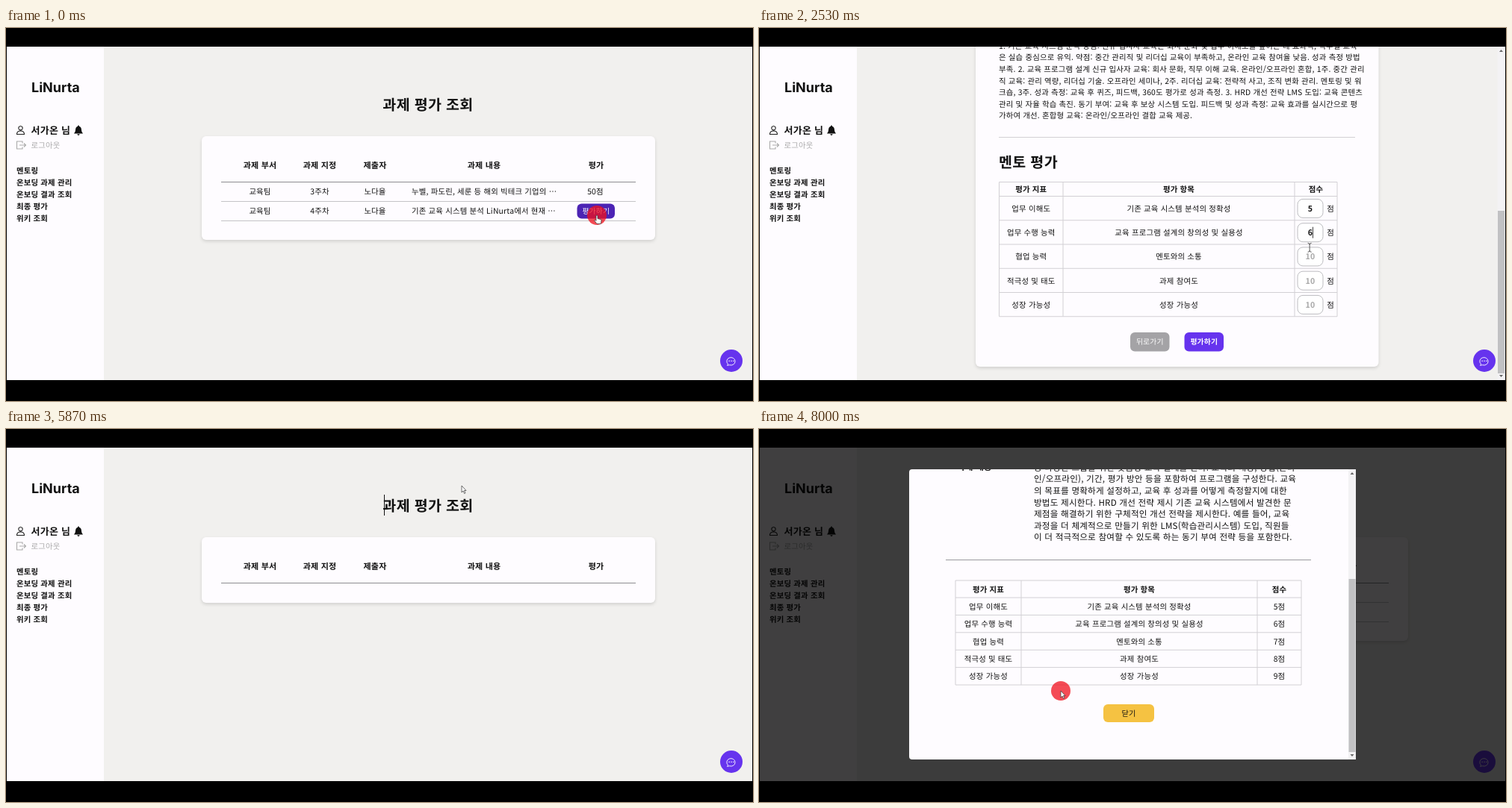
Animation of 1000x500 px, one loop 8070 ms. Source, as an HTML page:

```html
<!DOCTYPE html>
<html lang="ko">
<head>
<meta charset="utf-8">
<style>
html, body { margin: 0; width: 100%; height: 100%; overflow: hidden; background: #000; }
svg { display: block; width: 100%; height: 100%; }
text { font-family: "Noto Sans CJK KR", "Noto Sans KR", "Noto Sans CJK", sans-serif; fill: #111;
  letter-spacing: .0175em; text-rendering: geometricPrecision; white-space: pre; }
.b { font-weight: 700; }
.m { text-anchor: middle; }
.g { fill: #a9a9a9; }
.w { fill: #fff; }
.logo { font-family: Inter, sans-serif; letter-spacing: 0; }
.card { fill: #fefcff; filter: drop-shadow(0 2px 2px #0002); }
.line { fill: none; stroke: #d2d0d4; }
.icon { fill: none; stroke: #222; stroke-width: 1.1; }
</style>
</head>
<body>
<svg id="stage" viewBox="0 0 1000 500"></svg>
<script>
const LOOP = 8070, FPS = 15;
const PURPLE = '#6633ee';
const COMPANY = 'LiNurta', MENTOR = '서가온', STUDENT = '노다율';

// "|" marks line ends on the page, "^" those in the dialog
const TASK = `기존 교육 시스템 분석 ${COMPANY}에서 현재 제공하는 교육 프로그램을 분^석하고, 어떤 부분이 잘 작동하고, 어떤 부|분에서 개선이 필요한지 평가^한다. 직원들의 피드백을 바탕으로 프로그램의 강점과 약점을 도출한다.^ 프로그램|의 목표 달성도, 참여도, 효과성 등을 분석한다. 교육 프로그램^ 설계 조직의 목표와 직원들의 역량 개발 요구를 반|영하여, 개선된 교육^ 프로그램을 설계한다. 교육 대상: 신규 입사자, 중간 관리직, 리더십 교육^ 등 다양한 그룹을| 위한 맞춤형 교육 설계를 한다. 교육의 내용, 방법(온라^인/오프라인), 기간, 평가 방안 등을 포함하여 프로그램을| 구성한다. 교육^의 목표를 명확하게 설정하고, 교육 후 성과를 어떻게 측정할지에 대한^ 방법도 제시한다. HRD 개|선 전략 제시 기존 교육 시스템에서 발견한 문^제점을 해결하기 위한 구체적인 개선 전략을 제시한다. 예를 들어,| 교육^과정을 더 체계적으로 만들기 위한 LMS(학습관리시스템) 도입, 직원들^이 더 적극적으로 참여할 수 있도록| 하는 동기 부여 전략 등을 포함한다.`;
const ANSWER = `1. 기존 교육 시스템 분석 강점: 신규 입사자 교육은 회사 문화 및 업무 이해도를 높이는 데 효과적, 직무별 교육|은 실습 중심으로 유익. 약점: 중간 관리직 및 리더십 교육이 부족하고, 온라인 교육 참여율 낮음. 성과 측정 방법|부족. 2. 교육 프로그램 설계 신규 입사자 교육: 회사 문화, 직무 이해 교육. 온라인/오프라인 혼합, 1주. 중간 관리|직 교육: 관리 역량, 리더십 기술. 오프라인 세미나, 2주. 리더십 교육: 전략적 사고, 조직 변화 관리. 멘토링 및 워|크숍, 3주. 성과 측정: 교육 후 퀴즈, 피드백, 360도 평가로 성과 측정. 3. HRD 개선 전략 LMS 도입: 교육 콘텐츠|관리 및 자율 학습 촉진. 동기 부여: 교육 후 보상 시스템 도입. 피드백 및 성과 측정: 교육 효과를 실시간으로 평|가하여 개선. 혼합형 교육: 온라인/오프라인 결합 교육 제공.`;
const CRITERIA = [
  ['업무 이해도', '기존 교육 시스템 분석의 정확성'],
  ['업무 수행 능력', '교육 프로그램 설계의 창의성 및 실용성'],
  ['협업 능력', '멘토와의 소통'],
  ['적극성 및 태도', '과제 참여도'],
  ['성장 가능성', '성장 가능성'],
];

// y is the visual middle of the line
const text = (s, x, y, cls = '', size = 10.4) =>
  `<text x="${x}" y="${y + size * .37}" font-size="${size}" class="${cls}">${s}</text>`;
const rect = (x, y, w, h, fill, r = 0, more = '') =>
  `<rect x="${x}" y="${y}" width="${w}" height="${h}" rx="${r}" fill="${fill}" ${more}/>`;
const path = (d, more = 'class="line"') => `<path d="${d}" ${more}/>`;
const group = (id, body, more = '') => `<g id="${id}" ${more}>${body}</g>`;
const shift = (y, body) => `<g transform="translate(0 ${y})">${body}</g>`;
const lines = (s, x, y, size) =>
  s.split('|').map((l, i) => text(l.trim(), x, y + i * 15.58, '', size)).join('');
const button = (s, x, y, w, h, fill, cls, size = 9.8) =>
  rect(x, y, w, h, fill, 6) + text(s, x + w / 2, y + h / 2, 'm ' + cls, size);

function scoreTable(xs, top, head, row, lastCell) {
  const mid = i => (xs[i] + xs[i + 1]) / 2;
  const bottom = top + head + row * 5;
  let out = path(xs.map(x => `M${x} ${top}V${bottom}`).join('') + `M${xs[0]} ${top}H${xs[3]}`);
  ['평가 지표', '평가 항목', '점수'].forEach((s, i) => out += text(s, mid(i), top + head / 2 + .3, 'm b'));
  CRITERIA.forEach((c, k) => {
    const y = top + head + row * k, cy = y + row / 2 + .3;
    out += path(`M${xs[0]} ${y}H${xs[3]}`) + text(c[0], mid(0), cy, 'm') + text(c[1], mid(1), cy, 'm') + lastCell(k, cy, mid(2));
  });
  return out + path(`M${xs[0]} ${bottom}H${xs[3]}`);
}

function scrollbar(id, x, top, bottom, size) {
  const c = x + 5;
  return rect(x, top, 10, bottom - top, '#f3f2f4') +
    path(`M${c - 2.5} ${top + 7}l2.5 -3 2.5 3zM${c - 2.5} ${bottom - 7}l2.5 3 2.5 -3z`, 'fill="#666"') +
    rect(x + .5, 0, 9, size, '#c1c1c3', 0, `id="${id}"`);
}

const sidebar = rect(1, 25, 130, 447, '#fefcff') +
  text(COMPANY, 34, 79, 'b logo', 18) +
  path('M19.500 131.500a2.700 2.700 0 1 0 .01 0zM14.500 142.500q0 -4.500 5 -4.500t5 4.500z', 'class="icon"') +
  text(MENTOR + ' 님', 33.5, 137, 'b', 13) +
  path('M97 130.500q1 0 1 1.200q3 1 3 5q0 3 2 4.800h-12q2 -1.800 2 -4.800q0 -4 3 -5q0 -1.200 1 -1.200zM95.300 142.200h3.400q-.5 1.700 -1.700 1.700t-1.700 -1.700z', 'fill="#111"') +
  path('M22 154.500v-2.500h-7.500v10H22v-2.500M18 157h8.500m-2.500 -2.500 2.500 2.500 -2.500 2.500', 'class="icon" style="stroke:#aaa"') +
  text('로그아웃', 33.5, 157, 'g') +
  ['멘토링', '온보딩 과제 관리', '온보딩 결과 조회', '최종 평가', '위키 조회']
    .map((s, i) => text(s, 14, 191 + i * 16.1, 'b')).join('');

const columns = [340, 420, 494, 640, 790];
const listRow = (y, week, s) => text('교육팀', 340, y, 'm') + text(week, 420, y, 'm') +
  text(STUDENT, 494, y, 'm') + text(s, 543, y) + path(`M288 ${y + 13}H843`, 'class="line" style="stroke:#c4c4c6"');
const list = text('과제 평가 조회', 565, 103, 'm b', 19.5) +
  rect(262, 145, 607, 139, '', 6, 'class="card" id="listCard"') +
  ['과제 부서', '과제 지정', '제출자', '과제 내용', '평가'].map((s, i) => text(s, columns[i], 184, 'm b', 11)).join('') +
  path('M288 206.500H843', 'stroke="#8c8c90"') +
  group('rows',
    listRow(219.5, '3주차', '누벨, 파도린, 세룬 등 해외 빅테크 기업의 ⋯') + text('50점', 789, 219.5, 'm') +
    listRow(245.5, '4주차', `기존 교육 시스템 분석 ${COMPANY}에서 현재 ⋯`) +
    group('todo', button('평가하기', 764.5, 235.5, 50.5, 20, '#4c24b4', 'w')) +
    group('graded', text('35점', 789, 245.5, 'm'))) +
  path('M506.500 88V116', 'id="titleCaret" stroke="#111"');

const inputCell = (k, y) =>
  rect(721, y - 12.5, 34, 25, '#fff', 7, 'stroke="#bdbdc0"') +
  `<text id="score${k}" class="m b" x="738" y="${y + 4}" font-size="10.6"></text>` + text('점', 765, y, 'm') +
  path(`M0 ${y - 7.500}v15`, `id="caret${k}" stroke="#111" stroke-width=".8"`);
const detail = rect(290, 43, 539.5, 749, '', 6, 'class="card"') +
  text('HRD 시스템 개선 및 직원 교육 프로그램 설계', 321, 87, 'b', 19.5) +
  text('과제 파일', 321, 118, 'b', 12.2) + rect(380, 107, 35.5, 21, '#d3d2d5', 6) +
  path('M391.500 114.500l2.500 -1.500 5.500 6 -3 2.500 -5 -5zM393 116l4 4', 'fill="#aaa" stroke="#888"') +
  lines(TASK.replaceAll('^', ''), 321, 146) + path('M321 299.500H798') +
  text('과제 제출', 321, 334, 'b', 19.5) + lines(ANSWER, 321, 362) +
  shift(338, path('M321 146.500H798') + text('멘토 평가', 321, 180, 'b', 19.5) +
    scoreTable([321.5, 407, 717, 774], 206.5, 19, 32.25, inputCell) +
    button('뒤로가기', 497, 408, 52.5, 25.5, '#a4a3a6', 'w') +
    button('평가하기', 569.5, 408, 52.5, 25.5, PURPLE, 'w b'));

const chat = `<circle cx="971" cy="446" r="15" fill="${PURPLE}"/>` +
  path('M966.500 450.500a5.600 5.200 0 1 1 2 1.200l-3 .6z', 'fill="none" stroke="#fff" stroke-width=".9"') +
  path('M967.500 446.300h1.300m1.600 0h1.300m1.600 0h1.300', 'stroke="#fff" stroke-width="1.300"');

const alertBox = rect(354, 25, 291, 79, '#fff', 5, 'style="filter:drop-shadow(0 1px 3px #0005)"') +
  text('localhost:3000 내용:', 369, 43, '', 9.8) + text('평가가 완료되었습니다.', 369, 62, '', 8.6) +
  button('확인', 592, 76, 38, 20, '#1a63d8', 'w', 8.5);

const field = (name, value, y) => text(name, 265, y, 'b', 11.6) + text(value, 368, y, '', 11.6);
const modal = rect(1, 25, 998, 447, '#000', 0, 'opacity=".75"') +
  rect(201, 54, 598, 389, '#fefcff', 4) +
  `<g clip-path="url(#modalClip)">` + group('modalBody',
    field('제출자', STUDENT, 134) + field('과제 부서', '교육팀', 152) + field('과제 지정', '4주차', 170) +
    field('과제 내용', '', 281) + lines(TASK.replaceAll('|', '').replaceAll('^', '|'), 368, 188, 11.6) +
    path('M250 405.500H739', 'stroke="#9a9a9e"') +
    shift(230, scoreTable([263, 351, 667, 726], 203, 23, 23.4, (k, y, x) => text(k + 5 + '점', x, y, 'm')) +
      button('닫기', 461, 369, 68, 24, '#f5c242', '', 10.2))) + '</g>' +
  scrollbar('modalThumb', 789, 54, 443, 232);

const pointer = group('cursor',
  path('M0 0v9l2 -2 1.600 3.500 1.400 -.7 -1.600 -3.300h2.600z', 'id="arrow" fill="#fff" stroke="#333" stroke-width=".7"') +
  path('M-1 .5q1 -1 2 0v4l4 1q1 .3 1 1.500l-.8 4.500h-5.200l-3.500 -4.500q.3 -1.200 1.500 -.6l1 1z', 'id="hand" fill="#fff" stroke="#333" stroke-width=".7"') +
  path('M-2.500 -6q2.500 0 2.500 2v8q0 2 -2.500 2M2.500 -6q-2.500 0 -2.500 2M0 4q0 2 2.500 2', 'id="beam" fill="none" stroke="#333" stroke-width=".8"'));

stage.innerHTML = `<defs><clipPath id="pageClip">${rect(1, 25, 998, 447)}</clipPath>
  <clipPath id="modalClip">${rect(201, 54, 588, 389)}</clipPath></defs>` +
  rect(0, 0, 1000, 500, '#000') +
  `<g clip-path="url(#pageClip)">` + rect(1, 25, 998, 447, '#f1f0ee') +
  group('list', list) + group('detail', group('detailBody', detail) + scrollbar('pageThumb', 988.5, 25, 472, 218)) +
  sidebar + chat + group('alertBox', alertBox) + group('modal', modal) +
  '<circle id="click" r="13" fill="#f0101c" opacity=".75"/>' + pointer + '</g>';

const moves = [
  [190, 791, 251], [530, 683, 238], [1050, 683, 238], [1460, 730, 242], [1800, 730, 242], [2060, 738, 275],
  [2330, 738, 275], [2590, 737, 297], [2870, 737, 297], [3190, 738, 338], [3450, 738, 338], [3530, 735, 369],
  [4200, 735, 369], [4660, 595, 421], [4930, 595, 421], [5330, 610, 76], [5930, 610, 76], [6330, 552, 245],
  [6660, 552, 245], [7330, 498, 270], [7400, 498, 270], [7920, 404, 351],
];
const clicks = [-10, 1460, 2060, 2590, 3190, 3920, 4725, 5390, 6330, 7920];
const typed = [1790, 2325, 2860, 3460, 4190];
const pageScroll = [[530, 0], [800, 100], [1270, 438]];
const modalScroll = [[6790, 0], [7260, 230]];

// Value number c of a keyframe list at time t, eased between keys
function along(keys, t, c = 1) {
  const i = keys.findIndex(k => k[0] > t);
  if (i < 0) return keys.at(-1)[c];
  if (i === 0) return keys[0][c];
  const a = keys[i - 1], b = keys[i], u = (t - a[0]) / (b[0] - a[0]);
  return a[c] + (b[c] - a[c]) * u * u * (3 - 2 * u);
}
const $ = id => document.getElementById(id);
const show = (id, on) => $(id).style.display = on ? '' : 'none';
const place = (id, x, y) => $(id).setAttribute('transform', `translate(${x} ${y})`);

function render(ms) {
  const t = Math.floor((ms % LOOP + 4) * FPS / 1000) * 1000 / FPS;
  const between = (a, b) => t >= a && t < b;
  const onDetail = between(190, 5590), loaded = !between(5590, 5925);

  show('detail', onDetail);
  show('list', !onDetail);
  show('rows', loaded);
  show('todo', t < 190);
  show('graded', t > 5590);
  show('titleCaret', t > 5590);
  $('listCard').setAttribute('height', loaded ? 139 : 88);

  const s = along(pageScroll, t);
  place('detailBody', 0, 100 - s);
  place('pageThumb', 0, 32 + s / 438 * 213);
  typed.forEach((at, k) => {
    const el = $('score' + k), done = t >= at;
    el.textContent = done ? k + 5 : 10;
    el.setAttribute('fill', '#111');
    el.style.fill = done ? '#111' : '#a9a9a9';
    place('caret' + k, done ? 741.5 : 731.5, 0);
    show('caret' + k, between(clicks[k + 1], clicks[k + 2]));
  });

  show('alertBox', between(4925, 5525));
  show('modal', t >= 6525);
  const m = along(modalScroll, t);
  place('modalBody', 0, -m);
  place('modalThumb', 0, 65 + m / 230 * 136);
  $('modalThumb').setAttribute('height', t < 6590 ? 272 : 232);

  const x = along(moves, t), y = along(moves, t, 2);
  const beam = between(400, 4400), hand = t < 190 || between(4590, 5000) || between(6250, 7350);
  place('cursor', x, y);
  place('click', x, y);
  show('beam', beam);
  show('hand', hand);
  show('arrow', !beam && !hand);
  show('click', clicks.some(c => between(c, c + 200)));
}

const start = performance.now();
function tick() {
  render(performance.now() - start);
  requestAnimationFrame(tick);
}
tick();
</script>
</body>
</html>
```
